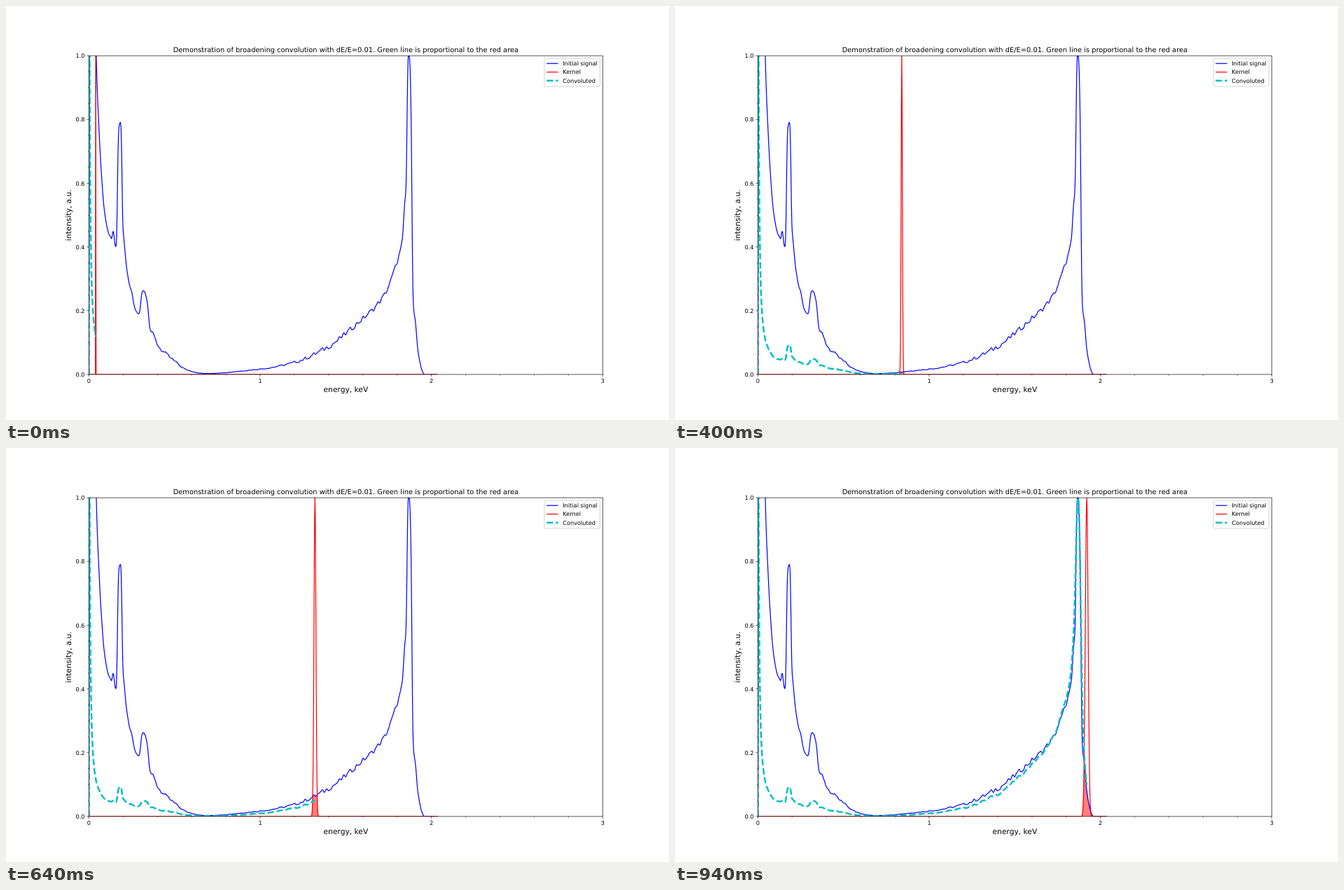
These frames come from a looping animation (947 px wide and 592 px high, 960 ms). An HTML page:

```html
<!DOCTYPE html>
<html>
<head>
<meta charset="utf-8">
<style>
html, body { margin: 0; width: 100%; height: 100%; overflow: hidden; background: #fff; }
svg { display: block; font-family: "DejaVu Sans", sans-serif; text-rendering: geometricPrecision; }
path, line { fill: none; }
</style>
</head>
<body>
<svg id="stage" width="947" height="592" viewBox="0 0 947 592"></svg>
<script>
const LEFT = 118.4, RIGHT = 852.3, TOP = 71.1, BOTTOM = 526.9;
const UNIT = (RIGHT - LEFT) / 3, HEIGHT = BOTTOM - TOP;
const STEP = 0.002, COUNT = 1019, CAP = BOTTOM / HEIGHT;
const SIGMA = 0.01 / 2.355; // relative width: dE/E as full width at half maximum
const BLUE = '#00f', RED = '#f00', CYAN = '#00bfbf';
const px = e => LEFT + e * UNIT;
const py = v => BOTTOM - v * HEIGHT;

// Background of the spectrum: [energy, intensity]
const background = [
  [0.001, 43.3], [0.043, 1.007], [0.06, 0.76], [0.08, 0.577], [0.1, 0.482], [0.131, 0.42],
  [0.145, 0.444], [0.156, 0.4], [0.2, 0.435], [0.225, 0.315], [0.25, 0.255], [0.275, 0.197],
  [0.29, 0.19], [0.36, 0.138], [0.41, 0.087], [0.5, 0.042], [0.57, 0.015], [0.68, 0.003],
  [1, 0.017], [1.2, 0.038], [1.4, 0.088], [1.56, 0.157], [1.72, 0.245], [1.8, 0.355],
  [1.83, 0.42], [1.846, 0.545], [1.858, 0.58], [1.87, 0.55], [1.895, 0.22], [1.905, 0.175],
  [1.92, 0.08], [1.945, 0.012], [1.96, 0], [2.04, 0]];

// Monotone cubic through points
function monotone(points) {
  const n = points.length, X = i => points[i][0], Y = i => points[i][1];
  const secant = i => (Y(i + 1) - Y(i)) / (X(i + 1) - X(i));
  const slope = i => {
    if (i === 0) return secant(0);
    if (i === n - 1) return secant(n - 2);
    const a = secant(i - 1), b = secant(i);
    return a * b <= 0 ? 0 : 2 * a * b / (a + b);
  };
  return x => {
    let i = 0;
    while (i < n - 2 && X(i + 1) < x) i++;
    const h = X(i + 1) - X(i), t = (x - X(i)) / h, s = 1 - t;
    return s * s * ((1 + 2 * t) * Y(i) + t * h * slope(i)) +
           t * t * ((3 - 2 * t) * Y(i + 1) - s * h * slope(i + 1));
  };
}

const random = n => { const r = Math.sin(n * 12.9898) * 43758.5453; return 2 * (r - Math.floor(r)) - 1; };
function noise(u) {
  const i = Math.floor(u), t = (1 - Math.cos((u - i) * Math.PI)) / 2;
  return random(i) * (1 - t) + random(i + 1) * t;
}

// Energy times intensity stays bounded near zero, so that product is interpolated
const product = monotone(background.map(([e, v]) => [e, e * v]));
const hump = (e, center, width) => Math.exp(-(((e - center) / width) ** 4));
function spectrum(e) {
  if (e === 0) return 0;
  const base = Math.max(0, product(e) / e);
  return base + Math.min(0.008, base * 0.1) * noise(e / 0.0125) +
    0.36 * hump(e, 0.18, 0.0145) + 0.095 * hump(e, 0.325, 0.025) + 0.45 * hump(e, 1.872, 0.0155);
}

const energies = Array.from({ length: COUNT }, (_, i) => i * STEP);
const signal = energies.map(spectrum);
const kernel = (e, center) => Math.exp(-(((e - center) / (SIGMA * center)) ** 2) / 2);
const area = energies.map(c => c &&
  energies.reduce((sum, e, i) => sum + signal[i] * kernel(e, c), 0));
const peak = Math.max(...area.slice(COUNT / 2));
const convoluted = area.map(v => v / peak);

// Polyline that starts afresh wherever it leaves the top of the stage
function trace(values) {
  return values.map((v, i) => {
    const x = px(energies[i]).toFixed(2), y = py(Math.min(v, CAP)).toFixed(2);
    return `${i ? 'L' : 'M'}${x},${y}` + (v > CAP ? `M${x},${y}` : '');
  }).join('');
}

const stage = document.getElementById('stage');
function add(tag, attrs, parent = stage, content = '') {
  const node = document.createElementNS('http://www.w3.org/2000/svg', tag);
  for (const key in attrs) node.setAttribute(key, attrs[key]);
  node.textContent = content;
  parent.appendChild(node);
  return node;
}
const text = (content, x, y, size, anchor = 'middle', more = {}) =>
  add('text', { x, y, 'font-size': size, 'text-anchor': anchor, ...more }, stage, content);
const line = (x1, y1, x2, y2, width, stroke = '#000', more = {}) =>
  add('line', { x1, y1, x2, y2, stroke, 'stroke-width': width, ...more });

const frame = { x: LEFT, y: TOP, width: RIGHT - LEFT, height: HEIGHT };
add('rect', frame, add('clipPath', { id: 'axes' }));
const plot = add('g', { 'clip-path': 'url(#axes)', 'stroke-linejoin': 'round' });
const dash = { 'stroke-dasharray': '9.13 3.95' };
const overlap = add('path', { style: 'fill:#f00', stroke: RED, 'stroke-width': 0.8, opacity: 0.5 }, plot);
add('path', { d: trace(signal), stroke: BLUE, 'stroke-width': 1.23 }, plot);
const kernelLine = add('path', { stroke: RED, 'stroke-width': 1.23 }, plot);
const resultLine = add('path', { stroke: CYAN, 'stroke-width': 2.47, ...dash }, plot);

add('rect', { ...frame, fill: 'none', stroke: '#000', 'stroke-width': 0.66 });
for (let i = 0; i <= 15; i++) {
  const x = px(i / 5), major = i % 5 === 0;
  line(x, BOTTOM, x, BOTTOM + (major ? 2.9 : 1.65), major ? 0.66 : 0.5);
  if (major) text(i / 5, x, 539.3, 8.22);
}
for (let i = 0; i <= 20; i++) {
  const y = py(i / 20), major = i % 4 === 0;
  line(LEFT, y, LEFT - (major ? 2.9 : 1.65), y, major ? 0.66 : 0.5);
  if (major) text((i / 20).toFixed(1), 112.6, y + 3.1, 8.22, 'end');
}
text('Demonstration of broadening convolution with dE/E=0.01. Green line is proportional to the red area',
  485.4, 66.2, 9.87);
text('energy, keV', 485.4, 552.2, 10.69);
text('intensity, a.u.', 0, 0, 10.69, 'middle', { transform: 'translate(93.4 299) rotate(-90)' });

add('rect', { x: 768.9, y: 75.2, width: 79.4, height: 39.8, rx: 1.6,
  fill: '#fff', 'fill-opacity': 0.8, stroke: '#ccc', 'stroke-width': 0.8 });
[['Initial signal', BLUE, 1.23, {}], ['Kernel', RED, 1.23, {}], ['Convoluted', CYAN, 2.47, dash]]
  .forEach(([label, color, width, style], i) => {
    const y = 82.2 + i * 12.3;
    line(772.2, y, 788.6, y, width, color, style);
    text(label, 795.2, y + 2.9, 8.22, 'start');
  });

let shown = -1;
function draw() {
  const step = Math.floor(performance.now() % 960 / 20);
  if (step !== shown) {
    shown = step;
    const center = 0.04 * (step + 1);
    const bell = energies.map(e => kernel(e, center));
    kernelLine.setAttribute('d', trace(bell));
    overlap.setAttribute('d', trace(bell.map((v, i) => Math.min(v, signal[i]))) + 'Z');
    resultLine.setAttribute('d', trace(convoluted.slice(0, 20 * (step + 1) + 1)));
  }
  requestAnimationFrame(draw);
}
draw();
</script>
</body>
</html>
```
